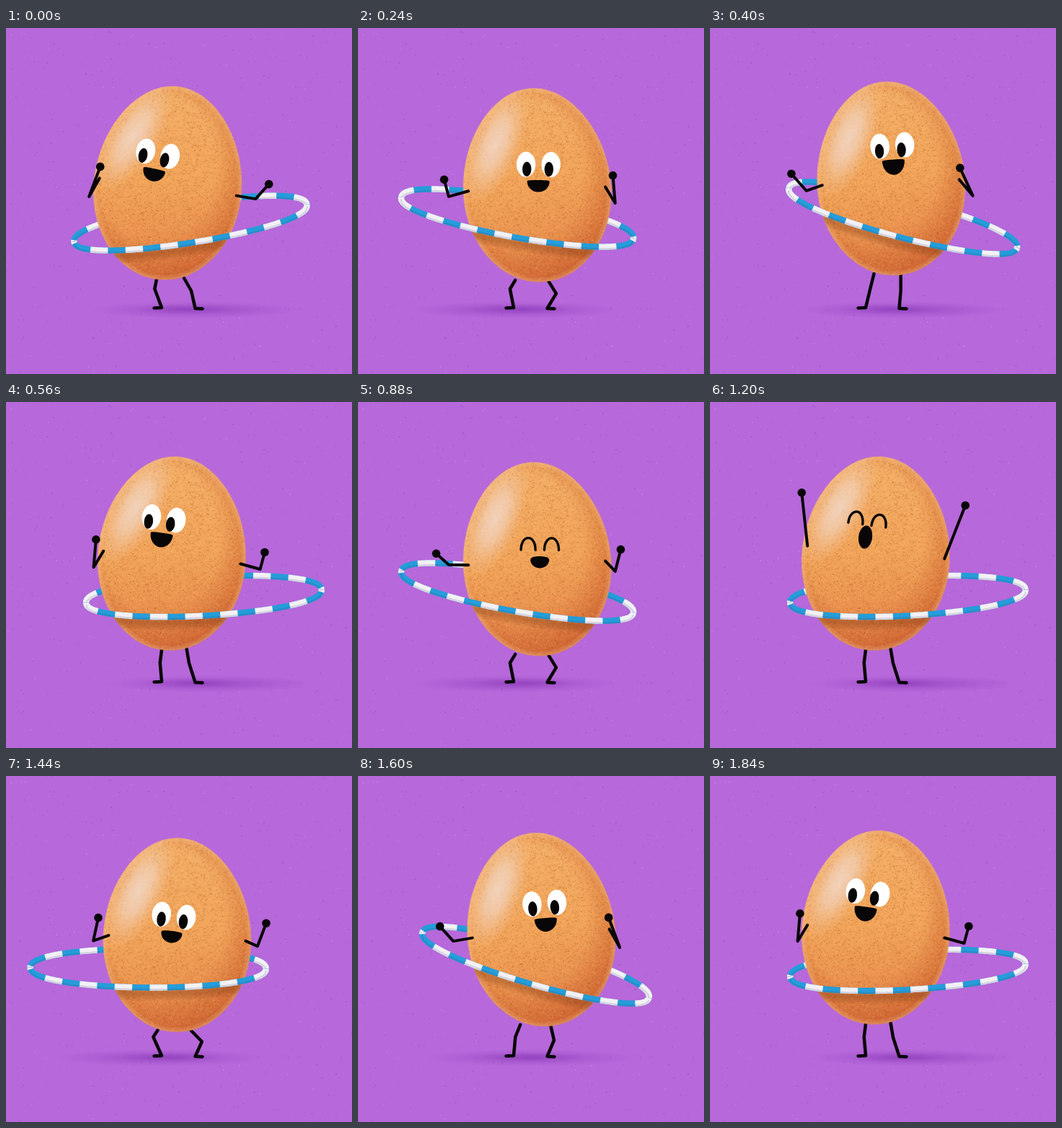
Recreate the animation shown at these times as an HTML page with a canvas. Size 480 px wide and 480 px high, loop 1.92 s.

```html
<!DOCTYPE html>
<html lang="en">
<head>
<meta charset="utf-8">
<title>Hula hoop egg</title>
<style>
  html, body { margin: 0; width: 100%; height: 100%; overflow: hidden; background: #b768da; }
  canvas { display: block; width: 480px; height: 480px; }
</style>
</head>
<body>
<canvas id="stage" width="480" height="480"></canvas>
<script>
const STEP = 80, COUNT = 24, SWING = 8;
const RAD = Math.PI / 180;
const INK = '#080607';
const ctx = document.getElementById('stage').getContext('2d');

function seeded(seed) {
  return () => {
    seed = (seed * 1664525 + 1013904223) >>> 0;
    return seed / 4294967296;
  };
}

function layer(w, h, draw) {
  const c = document.createElement('canvas');
  c.width = w;
  c.height = h;
  draw(c.getContext('2d'));
  return c;
}

// Smooth bump: 1 at mid, 0 from half steps away
function hump(step, mid, half) {
  const d = Math.min(1, Math.abs(step - mid) / half);
  return Math.cos(d * Math.PI / 2) ** 2;
}

// Every part swings around its mean once per eight steps
function poseAt(step) {
  const phase = step / SWING * 2 * Math.PI;
  const cos = Math.cos(phase), sin = Math.sin(phase);
  const wave = (mean, c, s) => mean + c * cos + s * sin;
  return {
    cos, sin,
    x: wave(239.2, -14.5, -1.8),
    y: wave(214, 1, 6.5),
    tilt: wave(-0.3, 5.5, 0.5) * RAD,
    hoop: {
      x: wave(247.7, 4.75, -40) + 3.5 * Math.cos(2 * phase) + 7 * Math.sin(3 * phase),
      y: wave(266.5, 4.2, 0),
      roll: wave(3.5, -12.6, -3.2) * RAD,
      shift: step > 0 && step < 9 ? 33.5 : 14.5
    },
    shade: wave(250, 11, -35),
    hips: [wave(217.2, -8, -6.6), wave(257, -10, -0.8)],
    knees: [wave(212.3, -6, -8), wave(264.5, -7.5, 7.3)],
    kneeY: wave(365.5, -1, 3),
    face: {
      x: wave(-4.5, -9.5, 0), y: wave(-38.5, -2, 12),
      tilt: wave(4, 8, 3) * RAD,
      look: wave(-3, -1.5, 1.6),
      gape: wave(18.3, -0.8, -3.4)
    },
    laugh: hump(step, 11, 4),
    yell: hump(step, 15, 4),
    shut: step >= 9 && step <= 17
  };
}

function eggPath(g) {
  g.beginPath();
  g.moveTo(-102.5, 8);
  g.bezierCurveTo(-102.5, -67, -55, -134.5, 0, -134.5);
  g.bezierCurveTo(55, -134.5, 102.5, -67, 102.5, 8);
  g.bezierCurveTo(102.5, 77, 57, 134.5, 0, 134.5);
  g.bezierCurveTo(-57, 134.5, -102.5, 77, -102.5, 8);
  g.closePath();
}

// Soft elliptical spot; stops are [offset, colour]
function glow(g, x, y, rx, ry, turn, stops) {
  g.save();
  g.translate(x, y);
  g.rotate(turn);
  g.scale(rx, ry);
  const fill = g.createRadialGradient(0, 0, 0, 0, 0, 1);
  stops.forEach(s => fill.addColorStop(...s));
  g.fillStyle = fill;
  g.fillRect(-2, -2, 4, 4);
  g.restore();
}

const wall = layer(480, 480, g => {
  const rnd = seeded(7);
  g.fillStyle = '#b768da';
  g.fillRect(0, 0, 480, 480);
  for (let i = 0; i < 800; i++) {
    g.fillStyle = i % 3 ? `rgba(140,66,184,${0.1 + rnd() * 0.4})`
                        : `rgba(222,170,240,${0.1 + rnd() * 0.35})`;
    g.beginPath();
    g.ellipse(rnd() * 480, rnd() * 480, 0.4 + rnd(), 0.4 + rnd() * 0.5, rnd() * 3, 0, 7);
    g.fill();
  }
});

const shell = layer(240, 300, g => {
  const rnd = seeded(31);
  g.translate(120, 150);
  eggPath(g);
  g.clip();
  const base = g.createLinearGradient(-20, -134, 20, 134);
  base.addColorStop(0, '#f4b068');
  base.addColorStop(0.5, '#f2a55a');
  base.addColorStop(0.75, '#eb9450');
  base.addColorStop(1, '#dd7a44');
  g.fillStyle = base;
  g.fillRect(-120, -150, 240, 300);
  glow(g, -16, -18, 130, 162, 0, [[0, 'rgba(196,84,36,0)'], [0.62, 'rgba(196,84,36,0)'],
    [0.9, 'rgba(196,84,36,.45)'], [1, 'rgba(180,70,34,.6)']]);
  for (let i = 0; i < 13000; i++) {
    const s = 0.6 + rnd() * 0.8;
    g.fillStyle = i % 5 < 3 ? `rgba(166,74,24,${0.15 + rnd() * 0.35})`
                            : `rgba(255,204,130,${0.15 + rnd() * 0.3})`;
    g.fillRect(rnd() * 210 - 105, rnd() * 272 - 136, s, s);
  }
  glow(g, -54, -60, 36, 88, 0.45, [[0, 'rgba(242,216,200,.88)'], [0.4, 'rgba(242,212,192,.68)'],
    [1, 'rgba(242,195,155,0)']]);
  eggPath(g);
  for (const w of [2, 6, 12]) {
    g.lineWidth = w;
    g.strokeStyle = 'rgba(246,196,150,.16)';
    g.stroke();
  }
});

// Front half of the hoop, left to right, with slightly blunt ends
const hoopArc = new Path2D();
let arcLength = 0;
for (let i = 0, px, py; i <= 180; i++) {
  const x = -163.5 * Math.cos(i * RAD);
  const y = 27 * Math.max(0, Math.sin(i * RAD)) ** 0.88;
  hoopArc.lineTo(x, y);
  if (i) arcLength += Math.hypot(x - px, y - py);
  [px, py] = [x, y];
}
const DASH = arcLength / 14;

function hoopStroke(h, flip, dy, width, color) {
  ctx.save();
  ctx.translate(h.x, h.y + dy);
  ctx.rotate(h.roll);
  ctx.scale(1, flip);
  ctx.lineWidth = width;
  ctx.strokeStyle = color;
  ctx.stroke(hoopArc);
  ctx.restore();
}

// flip 1 is the front of the tube, -1 the mirrored back
function hoopHalf(h, flip) {
  ctx.save();
  ctx.lineCap = 'butt';
  hoopStroke(h, flip, 0, 8.4, '#259dda');
  ctx.setLineDash([DASH, DASH]);
  ctx.lineDashOffset = DASH / 2 - arcLength / 2 - h.shift;
  hoopStroke(h, flip, 0, 8.4, '#f3f1f5');
  ctx.setLineDash([]);
  hoopStroke(h, flip, 2.8, 2.4, 'rgba(50,60,100,.16)');
  ctx.restore();
}

function line(points, width) {
  ctx.beginPath();
  points.forEach(p => ctx.lineTo(...p));
  ctx.lineWidth = width;
  ctx.strokeStyle = INK;
  ctx.stroke();
}

function blob(x, y, rx, ry, fill) {
  ctx.fillStyle = fill;
  ctx.beginPath();
  ctx.ellipse(x, y, rx, ry, 0, 0, 7);
  ctx.fill();
}

function drawShadow(p) {
  glow(ctx, p.shade, 391, 145, 12, 0,
    [[0, 'rgba(128,48,176,.45)'], [0.45, 'rgba(132,52,180,.28)'], [1, 'rgba(140,60,188,0)']]);
  glow(ctx, (p.shade + 240) / 2, 390, 70, 7, 0,
    [[0, 'rgba(120,40,170,.3)'], [1, 'rgba(130,50,180,0)']]);
}

function drawLegs({ hips, knees, kneeY, y }) {
  const hipY = y + 132;
  line([[hips[0], hipY], [knees[0], 362], [216, 388], [205.5, 388.5]], 4.5);
  line([[hips[1], hipY], [knees[1], kneeY], [262.5, 389], [272.5, 389.5]], 4.5);
}

function drawEgg({ x, y, tilt, hoop }) {
  ctx.save();
  ctx.translate(x, y);
  ctx.rotate(tilt);
  ctx.drawImage(shell, -120, -150);
  eggPath(ctx);
  ctx.clip();
  ctx.rotate(-tilt);
  ctx.translate(-x, -y);
  for (const w of [5, 10, 15, 20]) hoopStroke(hoop, 1, 8, w, 'rgba(130,60,22,.11)');
  ctx.restore();
}

// round 0 is a grin with a flat top, 1 a full oval
function drawMouth(y, w, d, round) {
  const r = w / 2, top = y - d / 2, low = y + d / 2;
  const side = top + 2 + (d / 2 - 2) * round;
  const flat = r * (0.95 - 0.4 * round);
  const rise = (side - top) * 0.55, drop = (low - side) * 0.55;
  ctx.fillStyle = INK;
  ctx.beginPath();
  ctx.moveTo(-r, side);
  ctx.bezierCurveTo(-r, side - rise, -flat, top, 0, top);
  ctx.bezierCurveTo(flat, top, r, side - rise, r, side);
  ctx.bezierCurveTo(r, side + drop, r * 0.55, low, 0, low);
  ctx.bezierCurveTo(-r * 0.55, low, -r, side + drop, -r, side);
  ctx.fill();
}

function drawFace({ x, y, face, laugh, yell, shut }) {
  const mirth = Math.max(laugh, yell);
  ctx.save();
  ctx.translate(x + face.x + 2 * laugh, y + face.y + 7 * laugh);
  ctx.rotate(face.tilt);
  for (const side of [-1, 1]) {
    const ex = side * (shut ? 16.2 : 17.3);
    if (shut) {
      ctx.beginPath();
      ctx.moveTo(ex - 10, 9);
      ctx.bezierCurveTo(ex - 10, -13, ex + 10, -13, ex + 10, 9);
      ctx.strokeStyle = INK;
      ctx.lineWidth = 3.4;
      ctx.stroke();
    } else {
      blob(ex, 0, 13.2, 17.5, '#fff');
      blob(ex + face.look - side * 2, 6.6, 6.2, 10.2, INK);
    }
  }
  drawMouth(30 - 4 * mirth, 31 - 5 * laugh - 12 * yell, face.gape + 12 * yell,
    Math.max(yell, laugh * 0.5));
  ctx.restore();
}

function drawArms({ x, y, tilt, cos, sin, laugh, yell }) {
  const mix = (a, b) => a + (b - a) * yell;
  for (const side of [-1, 1]) {
    const sx = x + side * 95;
    const sy = y + 5.5 + side * (3.5 + 95 * Math.sin(tilt)) - 7 * yell;
    const reach = side * 18.5 + 10.5;
    const elbow = [sx + mix(side * 20.5 + 6 * cos - 3.7 * sin, reach / 2),
                   sy + mix(15 - side * 10.5 * cos - 8 * laugh, -37)];
    const hand = [sx + mix(side * (22 + 11 * laugh) + 23 * cos + 6.5 * sin, reach),
                  sy + mix(-16, -74)];
    line([[sx, sy], elbow, hand], 4);
    blob(...hand, 5.8, 5.8, INK);
  }
}

function draw(step) {
  const p = poseAt(step);
  ctx.lineCap = ctx.lineJoin = 'round';
  ctx.drawImage(wall, 0, 0);
  drawShadow(p);
  hoopHalf(p.hoop, -1);
  drawLegs(p);
  drawEgg(p);
  drawFace(p);
  hoopHalf(p.hoop, 1);
  drawArms(p);
}

function tick() {
  draw(Math.floor(performance.now() / STEP) % COUNT);
  requestAnimationFrame(tick);
}
tick();
</script>
</body>
</html>
```
